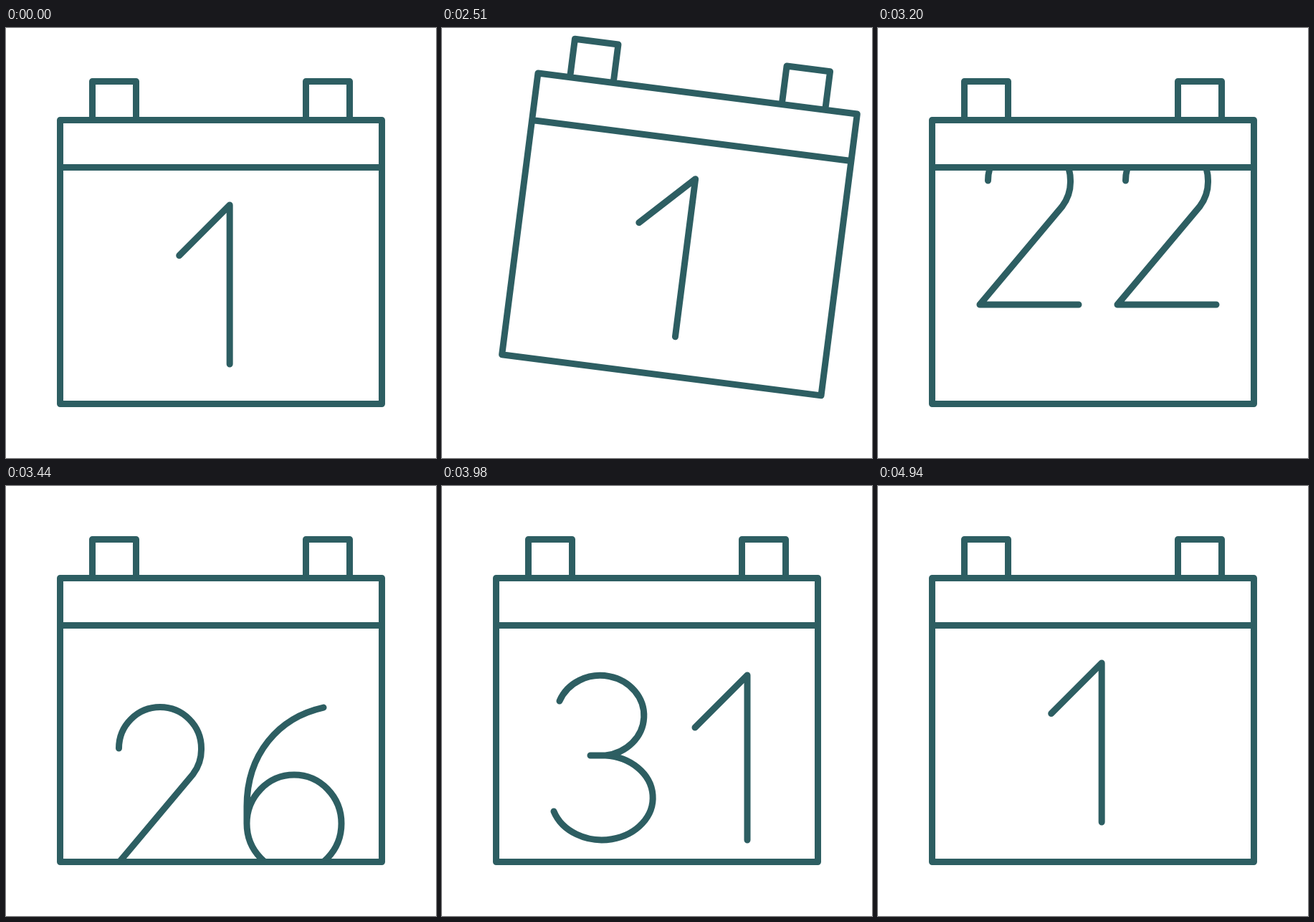
Animation of 600x600 px, one loop 4970 ms. Source, as an HTML page with a canvas:

```html
<!DOCTYPE html>
<html lang="en">
<head>
<meta charset="utf-8">
<title>Calendar</title>
<style>
  html, body { margin: 0; width: 100%; height: 100%; overflow: hidden; background: #fff; }
  canvas { display: block; width: 600px; height: 600px; }
</style>
</head>
<body>
<canvas id="stage" width="600" height="600"></canvas>
<script>
const ctx = document.getElementById('stage').getContext('2d');
const LOOP = 4970, START = 2030, STEP = 30;
const INK = '#2d5e62', STROKE = 9;
const SPACING = 700, LAST = 32, BASELINE = 469;

// Digits: advance, left bearing, outline (baseline at 0, 230 tall)
const DIGITS = [
  [188, 35, 'M0-115a67 115 0 1 1 134 0a67 115 0 1 1-134 0'],
  [166, 34, 'M0-157L73-230V0'],
  [192, 27, 'M11.5-173A57.5 57.5 0 0 1 126.5-173A57.5 57.5 0 0 1 115-137L0 0H138'],
  [190, 27, 'M8-194A61 56 0 1 1 72-118H51M72-118A71 59 0 1 1 0-40'],
  [192, 27, 'M104 0V-230L0-62H138'],
  [190, 27, 'M122-230H30L17-130A72 72 0 1 1 0-32'],
  [184, 25, 'M107-230C44-216 0-165 0-92V-68a66 68 0 1 1 132 0a66 68 0 1 1-132 0'],
  [188, 27, 'M0-230H134L40 0'],
  [192, 27, 'M69-124a54 53 0 1 1 .1 0M69-124a66 62 0 1 0 .1 0'],
  [184, 30, 'M132-162a66 68 0 1 1-132 0a66 68 0 1 1 132 0V-138C132-65 88-14 25 0']
].map(([advance, bearing, d]) => ({ advance, bearing, path: new Path2D(d) }));

const CALENDAR = new Path2D(
  'M75.5 128.5H524.5V524.5H75.5ZM75.5 194.5H524.5' +
  'M120.5 128.5V74.5H181.5V128.5M418.5 128.5V74.5H479.5V128.5');

// Keys: time in ms, value
const TILT = [[2000, 0], [2030, .25], [2375, 8], [2510, 7.3], [2860, -1.9], [3080, 0]];
const SCROLL = [[2510, 21700], [2700, 19000], [2900, 12800], [3200, 7083], [3680, 2207],
  [3980, 675], [4098, 415], [4203, 275], [4560, -14.5], [4730, -2], [4820, 1.5], [4940, 0]];

// Smooth curve through the keys, flat at turning points and ends
function curve(keys, t) {
  const end = keys.length - 1;
  if (t <= keys[0][0]) return keys[0][1];
  if (t >= keys[end][0]) return keys[end][1];
  const span = i => keys[i + 1][0] - keys[i][0];
  const rate = i => (keys[i + 1][1] - keys[i][1]) / span(i);
  const slope = i => {
    if (i === 0 || i === end || rate(i - 1) * rate(i) <= 0) return 0;
    return (span(i) * rate(i - 1) + span(i - 1) * rate(i)) / (span(i) + span(i - 1));
  };
  const i = keys.findIndex(k => k[0] > t) - 1;
  const h = span(i), u = (t - keys[i][0]) / h, v = 1 - u;
  return keys[i][1] * v * v * (1 + 2 * u) + keys[i + 1][1] * u * u * (3 - 2 * u)
    + h * u * v * (slope(i) * v - slope(i + 1) * u);
}

function drawNumber(n, y) {
  const digits = [...String(n)].map(c => DIGITS[c]);
  const scale = n > 9 ? 1 : .965;
  let x = -digits.reduce((sum, d) => sum + d.advance, 0) / 2;
  ctx.save();
  ctx.translate(n > 9 ? 307 : 289, y);
  ctx.scale(scale, scale);
  ctx.lineWidth = STROKE / scale;
  for (const d of digits) {
    ctx.save();
    ctx.translate(x + d.bearing, 0);
    ctx.stroke(d.path);
    ctx.restore();
    x += d.advance;
  }
  ctx.restore();
}

function draw(t) {
  const tilt = curve(TILT, t), top = BASELINE - curve(SCROLL, t);
  const pivotY = tilt > 0 ? 554 : 309;
  ctx.fillStyle = '#fff';
  ctx.fillRect(0, 0, 600, 600);
  ctx.save();
  ctx.strokeStyle = INK;
  ctx.lineWidth = STROKE;
  ctx.lineCap = ctx.lineJoin = 'round';
  ctx.translate(618, pivotY);
  ctx.rotate(tilt * Math.PI / 180);
  ctx.translate(-618, -pivotY);
  ctx.stroke(CALENDAR);
  ctx.beginPath();
  ctx.rect(77, 197, 446, 325);
  ctx.clip();
  for (let n = 1; n <= LAST; n++) {
    const y = top + (LAST - n) * SPACING;
    if (y > 190 && y < 760) drawNumber(n === LAST ? 1 : n, y);
  }
  ctx.restore();
}

function tick() {
  const t = performance.now() % LOOP;
  draw(t < START ? 0 : START + Math.floor((t - START) / STEP) * STEP);
  requestAnimationFrame(tick);
}
tick();
</script>
</body>
</html>
```
